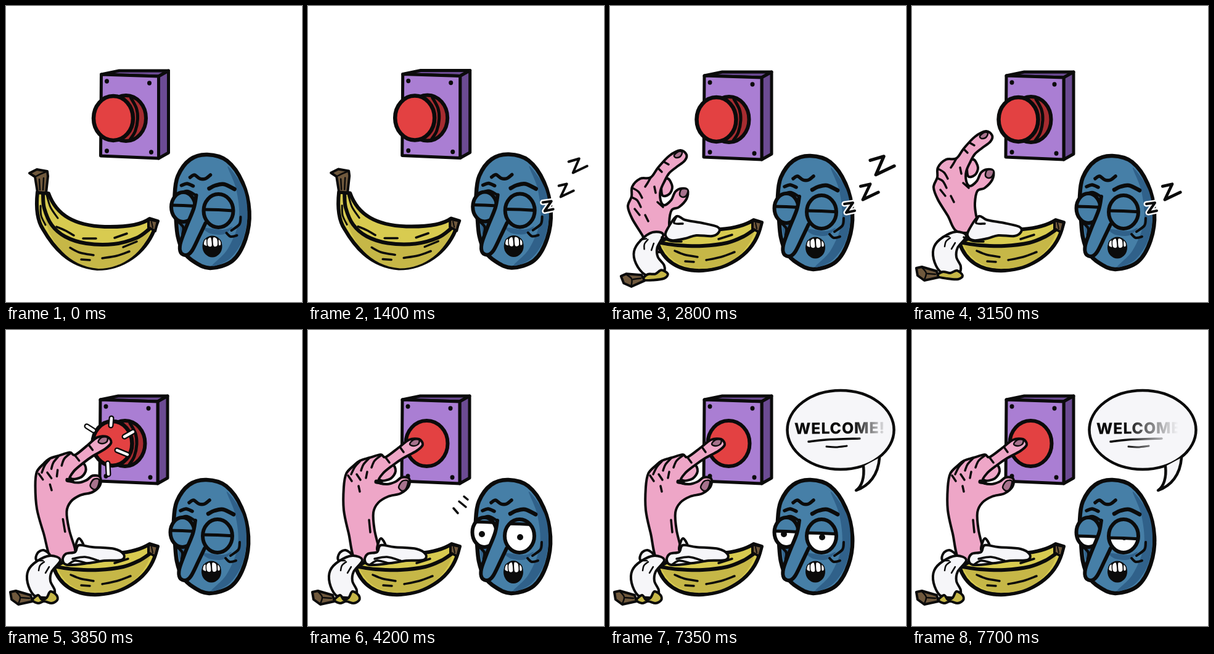
An HTML page that plays this animation: 480 by 480 pixels, repeating every 8000 ms.

```html
<!DOCTYPE html>
<html lang="en">
<head>
<meta charset="utf-8">
<title>Wake-up button</title>
<style>
html, body { margin: 0; width: 100%; height: 100%; overflow: hidden; background: #fff; }
svg { display: block; width: 100vw; height: 100vh; }
text { font: 800 25px Inter, "Open Sans", sans-serif; letter-spacing: .8px; }
</style>
</head>
<body>
<svg id="stage" viewBox="0 0 480 480" stroke-linecap="round" stroke-linejoin="round"></svg>
<script>
const INK = '#0b0b0b', SKIN = '#eea6c7', NAIL = '#a7728d', PEEL = '#f6f6f9';
const BLUE = '#467fa7', DEEP = '#30618a', YELLOW = '#d8cb50', OCHRE = '#c6b747', STEM = '#70593d';
const LOOP = 8000, STEP = 350;

// Smooth path through "x,y x,y ..." points.
function curve(points, closed) {
  const p = points.split(' ').map(s => s.split(',').map(Number));
  const n = p.length, at = i => closed ? p[(i + n) % n] : p[Math.max(0, Math.min(n - 1, i))];
  let d = `M${p[0]}`;
  for (let i = 0; i < (closed ? n : n - 1); i++) {
    const [a, b, c, e] = [at(i - 1), at(i), at(i + 1), at(i + 2)];
    const c1 = b.map((v, k) => v + (c[k] - a[k]) / 6);
    const c2 = c.map((v, k) => v - (e[k] - b[k]) / 6);
    d += `C${c1} ${c2} ${c}`;
  }
  return d + (closed ? 'Z' : '');
}
const path = (d, fill = 'none', w = 4, ink = INK) =>
  `<path d="${d}" fill="${fill}" stroke="${w ? ink : 'none'}" stroke-width="${w}"/>`;
const blob = (pts, fill, w = 4) => path(curve(pts, true), fill, w);
const line = (pts, w = 4, ink = INK) => path(curve(pts, false), 'none', w, ink);
const lines = (list, w) => list.map(pts => line(pts, w)).join('');
const poly = (pts, fill, w = 4) => path(`M${pts}Z`, fill, w);
const oval = (cx, cy, rx, ry, fill, w = 0) =>
  `<ellipse cx="${cx}" cy="${cy}" rx="${rx}" ry="${ry}" fill="${fill}" stroke="${INK}" stroke-width="${w}"/>`;
const group = (id, body, attrs = '') => `<g id="${id}" ${attrs}>${body}</g>`;
const haloed = (pts, outer, inner, under, over) =>
  path(`M${pts}`, 'none', outer, under) + path(`M${pts}`, 'none', inner, over);

const box =
  poly('153,113 182,107 262,107 246,116', '#6c4b93', 5) +
  poly('246,116 262,107 262,240 246,249', '#6c4b93', 5) +
  poly('153,113 246,116 246,249 152,245', '#aa7ed3', 5) +
  [[162, 124], [231, 127], [162, 237], [234, 239]].map(([x, y]) => oval(x, y, 3.5, 3.7, INK)).join('') +
  group('knobOut',
    oval(193, 184, 32.5, 37, '#a62c30', 6) +
    line('201,151 210,168 212,185 208,205 200,218', 5) +
    oval(172.5, 184, 32, 36, '#e34142', 6.5)) +
  group('knobIn', oval(192.5, 184, 34, 37, '#e34142', 6));

const sparks = ['131,156 142,163', '171,143 170,155', '192,173 206,165', '180,195 197,202', '165,216 166,234']
  .map(p => haloed(p, 9, 4.5, INK, '#fff')).join('');

const tip = poly('231,348 246,351 242,367 231,361', STEM, 4) + line('236,352 238,361', 2);
const marks = lines(['82,360 96,366 110,374', '125,379 146,379', '176,378 196,371', '104,394 120,402 142,406',
  '122,413 136,414', '156,411 180,407 200,400', '190,393 212,384'], 3.5);
const ridge = line('56,322 66,350 90,374 130,387 175,388 212,378 232,364', 6);
const lower = path('M62 345C85 378 120 390 165 389C200 386 220 375 235 364C225 400 190 428 150 428C100 424 72 385 62 345', OCHRE, 0);

const whole =
  path('M51 304C48 332 52 352 60 364C75 390 100 424 148 428C190 428 225 402 240 366L246 351L233 347C222 355 200 361 160 360C112 358 82 342 69 306Z', YELLOW, 6) +
  lower + line('60,308 62,330 74,357 96,376 130,387 175,388 212,378 232,364', 6) +
  lines(['66,308 72,328 84,346', '56,326 57,342 64,357'], 3) + marks + tip +
  poly('38,273 50,267 67,270 68,278 65,305 51,304 47,279', STEM, 4) +
  lines(['47,279 57,274 67,270', '54,283 55,300', '61,281 60,300'], 2.5);

const neckBody =
  path('M46 322C52 350 66 382 96 412C120 432 165 432 190 421C225 404 235 385 241 366L246 351L233 347C222 355 200 361 160 360C112 358 84 346 72 320Z', YELLOW, 6) +
  lower + ridge + marks + tip;

const finger =
  blob('48,312 55,298 61,280 75,268 88,267 91,277 82,287 74,293 68,305 60,314', SKIN) +
  blob('72,272 80,267 88,268 86,275 77,277', NAIL, 2.5) + lines(['60,288 66,291', '56,299 62,300'], 2.5);
const flaps =
  blob('49,316 40,303 28,308 22,324 25,337 36,337 44,326', PEEL) +
  blob('48,316 60,303 73,304 78,315 71,327 60,319', PEEL) +
  line('52,303 46,309 42,301', 3) +
  poly('22,342 31,340 42,345 41,370 34,367 25,369', STEM, 4) + lines(['30,345 30,364', '36,347 37,364'], 2.5);

const halfPeel =
  blob('70,338 50,338 34,352 25,374 34,385 46,378 54,362 68,354', PEEL) +
  blob('66,340 84,335 108,346 118,358 100,364 82,356', PEEL) +
  poly('26,380 44,381 43,405 27,403', STEM, 4) + line('35,385 35,400', 2.5);

const peeledBody =
  path('M77 384C86 412 110 431 150 429C196 426 232 400 243 362L246 351L233 347C222 354 205 360 180 362L110 368Z', YELLOW, 6) +
  path('M84 388C120 394 180 392 234 365C225 400 190 426 150 426C112 426 94 408 84 388', OCHRE, 0) +
  line('82,384 110,388 150,389 190,384 216,374 233,363', 6) +
  lines(['176,378 198,371', '105,397 120,403 142,407', '122,414 136,415', '156,412 180,407 202,399'], 3.5) + tip;
const leftPeel =
  blob('88,373 72,366 50,375 36,390 35,410 45,430 62,434 76,433 79,422 72,407 74,392', PEEL) +
  lines(['62,376 55,382 53,390', '70,384 64,394', '50,374 60,374'], 2.5);
const stub =
  poly('7,425 16,423 40,430 43,440 20,445 9,437', STEM, 4) + lines(['16,424 23,433 20,444', '25,434 38,435'], 2.5);
const reachPeel =
  peeledBody +
  group('hanging', leftPeel + blob('40,438 50,431 62,433 73,429 82,437 75,443 57,442', OCHRE) + stub) +
  blob('100,380 90,372 94,360 108,341 122,347 150,352 174,358 177,366 166,373 140,372 122,377', PEEL) +
  lines(['84,375 98,381 116,382', '108,341 104,352 118,353'], 3.5);
const pressPeel =
  blob('50,374 51,362 61,357 72,366 72,380', PEEL) +
  blob('112,356 118,338 126,350 122,362', PEEL) + peeledBody + leftPeel +
  blob('43,438 52,430 58,437 66,434 72,424 82,430 83,438 74,443 62,440 52,443', OCHRE) + stub +
  blob('100,381 92,373 97,363 112,360 118,349 140,352 176,355 191,364 187,373 160,374 134,378', PEEL) +
  lines(['100,381 112,374 130,378', '108,371 128,368 150,374'], 3.5);

const reachHand =
  blob('90,256 100,249 107,262 102,274 91,276', SKIN) +
  blob('72,365 58,340 42,314 35,294 41,278 42,262 55,249 72,247 84,231 102,212 120,203 130,210 127,220 114,230 102,240 95,252 88,268 88,284 94,292 105,284 112,270 122,265 132,268 130,282 118,295 106,300 102,320 104,340 108,352 100,366', SKIN) +
  blob('110,211 117,205 123,206 120,213 113,215', NAIL, 2.5) + blob('119,275 122,266 132,267 130,276 124,279', NAIL, 2.5) +
  lines(['72,247 67,256 63,262', '84,232 90,238', '94,222 101,226', '42,264 52,270 58,280', '41,279 50,284 56,295', '46,298 54,308', '63,308 68,318', '78,262 80,272', '83,287 92,295'], 3.5);
const pressHand =
  blob('114,234 136,219 142,229 134,241 118,244', SKIN) +
  blob('78,376 66,330 58,292 58,255 62,233 74,220 84,212 100,207 118,202 126,206 148,190 164,178 180,177 186,186 176,196 154,208 138,219 122,232 114,246 128,250 142,246 152,239 164,241 163,254 150,265 130,270 114,280 106,296 108,325 116,360 112,376', SKIN) +
  blob('165,185 171,178 180,178 179,185 171,188', NAIL, 2.5) + blob('147,255 153,245 162,245 159,257 153,261', NAIL, 2.5) +
  lines(['84,213 76,222 70,234', '99,208 90,218 86,228', '119,203 108,212 103,223', '126,207 132,215', '65,236 71,245', '79,234 85,243', '96,230 94,240', '99,308 101,328', '82,253 84,262', '150,191 155,198'], 3.5) +
  line('111,246 118,247', 7);

function eye(id, cx, cy, rx, ry, px, py) {
  return `<clipPath id="${id}Clip">${oval(cx, cy, rx, ry, '#000')}</clipPath>
    <g clip-path="url(#${id}Clip)">${oval(cx, cy, rx, ry, '#fff')}${oval(px, py, 5, 5, INK)}
    <rect id="${id}Lid" x="${cx - rx}" y="${cy - ry}" width="${2 * rx}" fill="${BLUE}"/>
    <path id="${id}Edge" stroke="${INK}" stroke-width="5" fill="none"/></g>` + oval(cx, cy, rx, ry, 'none', 6);
}
const face =
  blob('325,243 357,253 382,288 393,335 387,380 366,415 330,427 304,417 286,400 277,375 274,345 272,310 277,278 297,251', BLUE, 6.5) +
  blob('358,262 383,297 390,340 382,382 360,413 333,423 358,396 376,350 372,300', DEEP, 0) +
  blob('280,350 294,352 284,378', DEEP, 0) + blob('320,362 350,365 366,360 352,372 330,371', DEEP, 0) +
  line('297,280 304,276 313,282 322,282 330,276', 5.5) +
  line('283,293 292,290 302,294', 5.5) + line('328,298 338,293 352,291 369,299', 6.5) +
  eye('left', 286, 328, 19.5, 24, 282, 331) +
  lines(['278,352 286,361 285,372', '277,307 292,302 305,308'], 4.5) +
  path(curve('307,309 303,330 291,360 281,388 282,402 291,406 300,399 312,375 322,354'), BLUE, 6) +
  eye('right', 343, 334, 24, 27, 344, 336) +
  lines(['379,344 377,356 364,366', '356,370 363,376 373,374'], 4) +
  group('mouth', oval(333, 392, 16, 17.5, INK) +
    blob('319,389 320,382 324,380 325,391', '#fff', 1.5) + blob('325,380 331,377 333,390 329,393 325,390', '#fff', 1.5) +
    blob('334,377 341,379 342,390 337,393 334,390', '#fff', 1.5) + blob('343,380 347,384 347,390 343,390', '#fff', 1.5));

const zees = ['380,321 394,319 383,335 397,332', '406,294 419,291 409,312 430,302', '422,255 439,250 429,273 452,262']
  .map((p, i) => group('z' + i, haloed(p, 9, 4, '#fff', INK))).join('');

const bubble =
  oval(374, 162, 86.5, 64, PEEL, 4.5) +
  path('M411 221C413 240 408 254 399 260C420 253 435 235 437 207', PEEL, 4.5) +
  `<text x="299" y="168" fill="url(#fade)" transform="rotate(-.5 374 160)">WELCOME!</text>` +
  line('322,181 350,178 405,176', 3.5, 'url(#fade)') + line('351,189 366,190 384,188', 3, 'url(#fade)');

document.getElementById('stage').innerHTML =
  `<linearGradient id="fade" gradientUnits="userSpaceOnUse" y1="0" y2="0">
    <stop stop-color="${INK}"/><stop offset="1" stop-color="${INK}" stop-opacity="0"/></linearGradient>` +
  group('scene', box + group('reachHand', reachHand) + group('pressHand', pressHand) + group('sparks', sparks) +
    group('whole', whole, 'transform="translate(-1.5 0)"') + group('finger', finger) + group('neckBody', neckBody) +
    group('flaps', flaps) + group('halfPeel', halfPeel) + group('reachPeel', reachPeel) + group('pressPeel', pressPeel) +
    face + zees) +
  group('alert', lines(['236,289 243,297', '245,278 256,287', '253,270 259,275'], 3.5)) + group('bubble', bubble);

const el = id => document.getElementById(id);
const show = (id, on) => el(id).setAttribute('display', on ? 'inline' : 'none');
const move = (id, transform) => el(id).setAttribute('transform', transform);

function setEye(id, cx, cy, ry, y, shut) {
  el(id + 'Lid').setAttribute('height', shut ? 2 * ry : y - cy + ry);
  el(id + 'Edge').setAttribute('d', `M${cx - 26} ${y - 1}Q${cx} ${y - 1} ${cx + 26} ${y + 1}`);
}

function render(ms) {
  const s = Math.floor((ms % LOOP) / STEP);
  const sway = s < 2 ? [1.5, -2] : s < 3 ? [1, -1.2] : s < 5 ? [.7, -2.5] : s < 6 ? [.7, -1] : [0, 0];
  move('scene', `translate(${sway})`);

  show('whole', s < 5);
  show('finger', s === 5 || s === 6);
  move('finger', s === 5 ? 'translate(-3 16)' : '');
  show('neckBody', s >= 5 && s <= 7);
  show('flaps', s === 5 || s === 6);
  move('flaps', s === 5 ? 'translate(-3 -3)' : '');
  show('halfPeel', s === 7);
  show('reachPeel', s === 8 || s === 9);
  move('hanging', s === 8 ? 'rotate(-12 75 380)' : '');
  show('pressPeel', s >= 10);

  show('reachHand', s >= 7 && s <= 9);
  move('reachHand', s === 7 ? 'translate(68 360) scale(.64) translate(-85 -365)' : s === 8 ? 'translate(-6 31)' : '');
  show('pressHand', s >= 10);
  move('pressHand', s === 10 ? 'translate(76 374) skewX(6) scale(1 1.06) translate(-80 -374)'
    : s === 11 ? 'translate(76 374) skewX(4) scale(1 1.02) translate(-78 -374)' : '');
  show('sparks', s === 11);
  show('knobOut', s < 12);
  show('knobIn', s >= 12);

  // Snores build up and shrink back twice.
  const snores = s < 2 || s > 10 ? 0 : [1, 2, 3, 2][(s - 2) % 4];
  for (let i = 0; i < 3; i++) show('z' + i, i < snores);
  const loud = s === 8 || s === 9;
  move('z1', loud ? 'translate(404 302) scale(1.2) translate(-404 -302)' : '');
  move('z2', loud ? 'translate(422 262) scale(1.3) translate(-422 -264)' : '');

  const asleep = s < 12;
  const lid = asleep ? 333 : s < 15 ? 315 : s < 21 ? 322 : s < 22 ? 330 : 338;
  setEye('right', 343, 334, 27, lid, asleep);
  setEye('left', 286, 328, 24, lid - (asleep ? 7 : 3), asleep);
  move('mouth', s >= 12 && s < 15 ? 'translate(0 -23) scale(1 1.06)' : '');

  show('alert', s >= 12 && s < 21);
  show('bubble', s >= 15);
  const [from, to] = s < 21 ? [480, 490] : s < 22 ? [395, 450] : [345, 432];
  el('fade').setAttribute('x1', from);
  el('fade').setAttribute('x2', to);
}

const start = performance.now();
function tick() {
  render(performance.now() - start);
  requestAnimationFrame(tick);
}
render(0);
tick();
</script>
</body>
</html>
```
